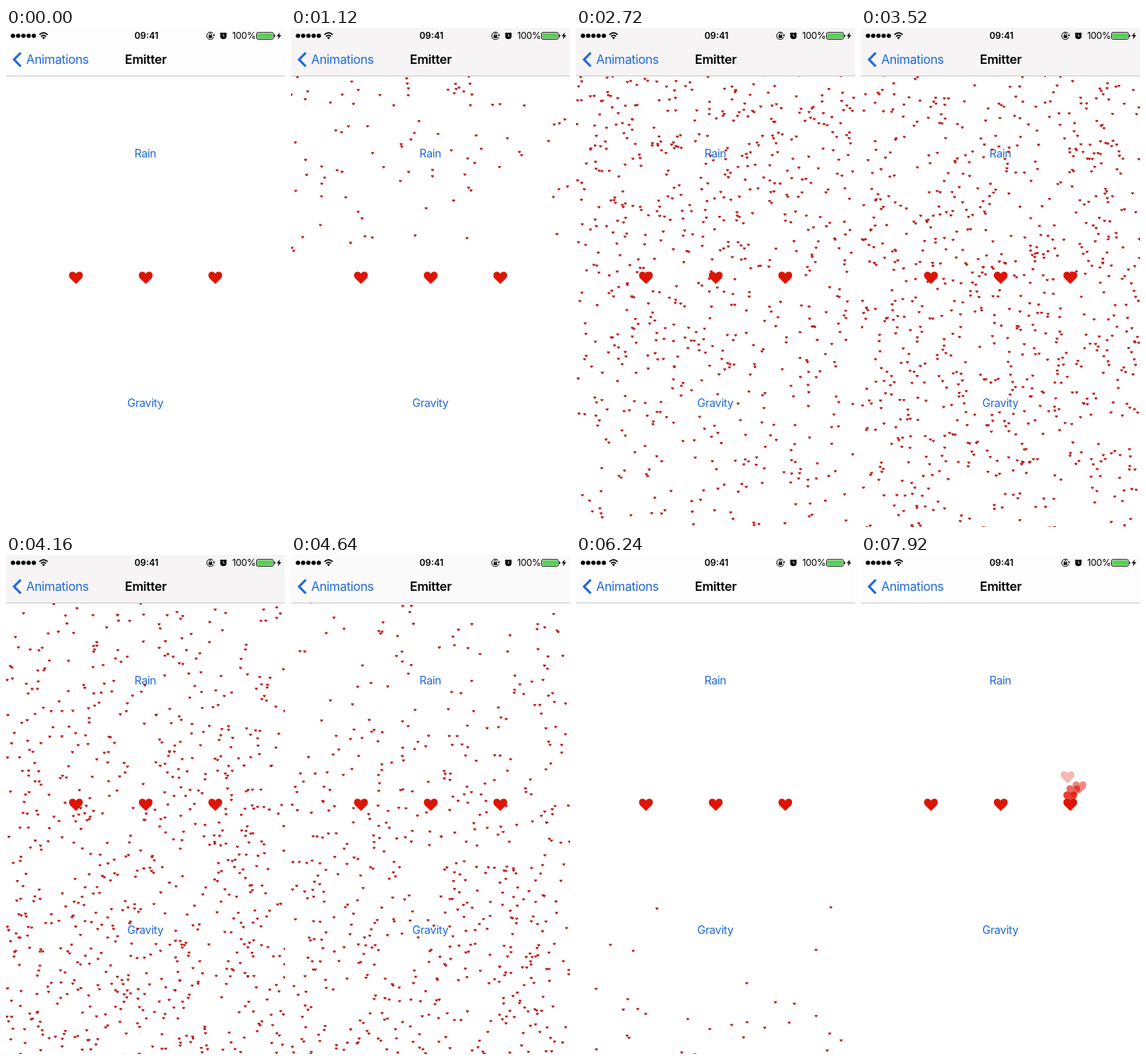
These frames come from a looping animation (359x640 px, 8000 ms). An HTML page with a canvas:

```html
<!DOCTYPE html>
<html lang="en">
<head>
<meta charset="utf-8">
<title>Emitter</title>
<style>
html, body { margin: 0; width: 100%; height: 100%; overflow: hidden; background: #fff; }
svg, canvas { position: absolute; left: 0; top: 0; width: 359px; height: 640px; }
text { font-family: Inter, "Liberation Sans", sans-serif; }
.mid { text-anchor: middle; }
.link { fill: #1f69db; }
.label { font-size: 14.4px; letter-spacing: -.3px; }
.line { fill: none; stroke: #000; }
</style>
</head>
<body>
<svg viewBox="0 0 359 640">
  <rect width="359" height="61" fill="#fdfdfd"/>
  <rect id="tint" width="359" height="61" fill="#f6f4f4" opacity="0"/>
  <rect y="61" width="359" height="1" fill="#cacaca"/>

  <g>
    <circle cx="9" cy="10" r="2.8"/><circle cx="15.7" cy="10" r="2.8"/><circle cx="22.4" cy="10" r="2.8"/>
    <circle cx="29.1" cy="10" r="2.8"/><circle cx="35.8" cy="10" r="2.8"/>
  </g>
  <g class="line" stroke-width="1.7">
    <path d="M43 8.6Q48.3 3.8 53.6 8.6M45.1 10.8Q48.3 8 51.5 10.8"/>
  </g>
  <path d="M46.3 12.3Q48.3 10.7 50.3 12.3L48.3 14.4Z"/>
  <text class="mid" x="180.7" y="14.2" font-size="11.6" font-weight="600">09:41</text>

  <g class="line">
    <path d="M266.6 7A4.7 4.7 0 1 0 267.4 11.6" stroke-width="1"/>
    <path d="M261.6 9.6V8.4a1.4 1.4 0 0 1 2.8 0V9.6" stroke-width=".9"/>
  </g>
  <path d="M260.7 9.3h4.6v3.4h-4.6ZM265.8 8.4h3.6L267.5 10.8Z"/>

  <circle cx="279.7" cy="10.2" r="4.1"/>
  <path class="line" stroke-width="1.1" d="M275.3 7.7L277.4 5.9M284.1 7.7L282 5.9"/>
  <path d="M279.7 8V10.4H281.4" fill="none" stroke="#fff" stroke-width=".8"/>

  <text x="290.9" y="14.3" font-size="12" letter-spacing="-.3">100%</text>
  <rect class="line" x="322.5" y="5.7" width="21.6" height="8.7" rx="1.6" stroke-width=".9"/>
  <rect x="323.5" y="6.7" width="19.6" height="6.7" rx=".8" fill="#58cf56"/>
  <path d="M345 8.3q1.5 .2 1.5 1.7t-1.5 1.7Z"/>
  <path d="M352.6 5.5L348.2 10.6H350.8L349.8 14.5L354.2 9.3H351.5Z"/>

  <path d="M19 31.8L10.4 40.5L19 49.2" fill="none" stroke="#1f69db" stroke-width="3"/>
  <text class="link" x="26" y="46.3" font-size="16" letter-spacing="-.35">Animations</text>
  <text class="mid" x="179.8" y="46.3" font-size="16" font-weight="600" letter-spacing="-.2">Emitter</text>
  <text class="mid link label" x="179.3" y="165.8">Rain</text>
  <text class="mid link label" x="179.3" y="485.8">Gravity</text>
</svg>
<canvas id="stage"></canvas>

<script>
const LOOP = 8, STEP = .08, BAR = 62;
const START = .1, HALF = 2.43;            // rain swells, then thins out again
const DROPS = 1500;

const canvas = document.getElementById('stage');
const tint = document.getElementById('tint');
const ctx = canvas.getContext('2d');
const ratio = window.devicePixelRatio || 1;
canvas.width = 359 * ratio;
canvas.height = 640 * ratio;

const heart = new Path2D('M0 8L-7.5 .6C-10.2 -2.4 -8.7 -7.7 -4.6 -7.7C-2.5 -7.7 -.9 -6.6 0 -5C.9 -6.6 2.5 -7.7 4.6 -7.7C8.7 -7.7 10.2 -2.4 7.5 .6Z');

let seed = 20177;
function rand() {
  seed = (seed * 1664525 + 1013904223) % 4294967296;
  return seed / 4294967296;
}

const drops = Array.from({ length: DROPS }, () => ({
  x: rand() * 359,
  born: START + HALF * (rand() + rand()),
  speed: 320 + rand() * 80
}));

// birth time and velocity of the hearts rising from the right button
const burst = [
  { born: 7.42, vx: -7, vy: -70 },
  { born: 7.56, vx: 33, vy: -61 },
  { born: 7.67, vx: 16, vy: -68 },
  { born: 7.79, vx: 0, vy: -69 }
];

function drawHeart(x, y, scale, color, alpha = 1) {
  ctx.save();
  ctx.translate(x, y);
  ctx.scale(scale, scale);
  ctx.globalAlpha = alpha;
  ctx.fillStyle = color;
  ctx.fill(heart);
  ctx.restore();
}

function draw(t) {
  ctx.setTransform(ratio, 0, 0, ratio, 0, 0);
  ctx.clearRect(0, 0, 359, 640);

  ctx.save();
  ctx.beginPath();
  ctx.rect(0, BAR, 359, 640 - BAR);
  ctx.clip();
  for (const d of drops) {
    const y = (t - d.born) * d.speed;
    if (y > BAR - 4 && y < 644) drawHeart(d.x, y, .215, '#bd1c1a');
  }
  ctx.restore();

  for (const b of burst) {
    const age = t - b.born;
    if (age > 0) drawHeart(269.3 + b.vx * age, 320 + b.vy * age, 1, '#e01507', Math.max(0, 1 - age * 1.38));
  }
  for (const x of [90, 179.8, 269.3]) drawHeart(x, 320.3, 1, '#de1405');

  const rate = 1 - Math.abs(t - START - HALF) / HALF;
  tint.setAttribute('opacity', Math.max(0, Math.min(1, rate * 3)));
}

// every sixth step is held twice as long
function frame(now) {
  let step = Math.floor(now / 1000 % LOOP / STEP + 1e-6);
  if (step % 6 === 1) step--;
  draw(step * STEP);
  requestAnimationFrame(frame);
}
draw(0);
requestAnimationFrame(frame);
</script>
</body>
</html>
```
